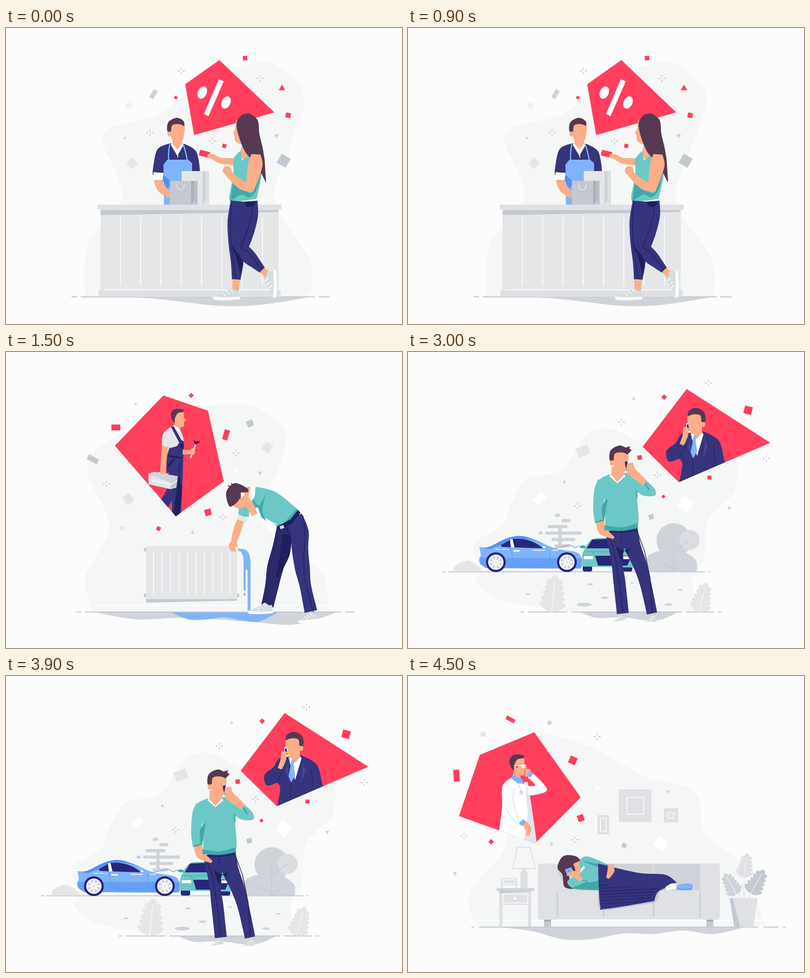
An HTML page that plays this animation: 800x600 px, repeating every 6000 ms.

```html
<!DOCTYPE html>
<html lang="en">
<head>
<meta charset="utf-8">
<title>Everyday help scenes</title>
<style>
html, body { margin: 0; width: 100%; height: 100%; overflow: hidden; background: #fcfcfc }
svg { display: block; width: 100%; height: 100% }
</style>
</head>
<body>
<svg id="stage" viewBox="0 0 800 600"></svg>
<script>
const BLOB = '#f5f7f7', RED = '#ff3f5c', NAVY = '#35347d', DARK = '#201f5e', GLASS = '#28267c', TEAL = '#6cc8c6', SEA = '#40a9a7',
  SKIN = '#fbae88', TAN = '#f39b75', HAIR = '#573852', PALE = '#e4e6e8', SOFT = '#dfe1e5', MID = '#d1d3da', GREY = '#c4c8d0',
  BLUE = '#80b4fa', DEEP = '#4f94f3', SHOE = '#d5dddf', WHITE = '#fff';

const repeat = (n, draw) => Array.from({ length: n }, (_, i) => draw(i)).join('');
const path = (fill, d) => `<path fill="${fill}" d="${d}"/>`;
const poly = (fill, pts) => `<polygon fill="${fill}" points="${pts}"/>`;
const rect = (fill, x, y, w, h, r = 0) => `<rect x="${x}" y="${y}" width="${w}" height="${h}" rx="${r}" fill="${fill}"/>`;
const line = (color, w, d) => `<path fill="none" stroke="${color}" stroke-width="${w}" stroke-linecap="round" stroke-linejoin="round" d="${d}"/>`;
const put = (art, x, y, turn = 0, sx = 1, sy = sx) => `<g transform="translate(${x} ${y}) rotate(${turn}) scale(${sx} ${sy})">${art}</g>`;
const oval = (fill, x, y, rx, ry = rx, turn = 0) => put(`<ellipse rx="${rx}" ry="${ry}" fill="${fill}"/>`, x, y, turn);
const chip = (fill, x, y, turn, w, h = w) => put(rect(fill, -w / 2, -h / 2, w, h), x, y, turn);
const tri = (fill, x, y, r, turn) => put(path(fill, `M0 ${-r}L${r} ${r * .8}H${-r}Z`), x, y, turn);
const inside = (id, pts, ...art) => `<clipPath id="${id}">${poly('', pts)}</clipPath>${poly(RED, pts)}<g clip-path="url(#${id})">${art.join('')}</g>`;

// Smooth closed shape through points; a trailing * marks a corner.
function form(fill, text) {
  const p = text.split(' ').map(s => [...s.replace('*', '').split(',').map(Number), s.endsWith('*')]);
  const n = p.length, at = i => p[(i + n) % n];
  const handle = (i, side) => {
    const a = at(i), k = a[2] ? 0 : side / 6;
    return [0, 1].map(j => (a[j] + (at(i + 1)[j] - at(i - 1)[j]) * k).toFixed(1));
  };
  return path(fill, `M${at(0).slice(0, 2)}` + repeat(n, i => `C${handle(i, 1)} ${handle(i + 1, -1)} ${at(i + 1).slice(0, 2)}`));
}
// Tapered tube along joints given as x,y,width.
function limb(fill, text) {
  const p = text.split(' ').map(s => s.split(',').map(Number)), last = p.length - 1;
  const edge = side => p.map(([x, y, w], i) => {
    const [a, b] = p[Math.max(0, i - 1)], [c, d] = p[Math.min(last, i + 1)], k = side * w / 2 / Math.hypot(c - a, d - b);
    return `${x - (d - b) * k},${y + (c - a) * k}${i % last ? '' : '*'}`;
  });
  return form(fill, [...edge(1), ...edge(-1).reverse()].join(' '));
}
// Pool below the ground line, with evenly spaced depths.
const pool = (fill, from, to, y, ...depths) => form(fill, [`${from},${y}*`,
  ...depths.map((d, i) => `${from + (to - from) * (i + 1) / (depths.length + 1)},${y + d}`), `${to},${y}*`].join(' '));
const ground = (y, ...spans) => spans.map(([a, b]) => line(GREY, 2, `M${a} ${y}H${b}`)).join('');
const bars = (n, x, step, top, bottom) => repeat(n, i => line('#f8f9f9', 2, `M${x + i * step} ${top}V${bottom}`));
const sparks = (...spots) => spots.map(([x, y]) => repeat(4, i =>
  put(line(GREY, 2, i % 2 ? 'M3.500 0h2' : 'M4 0h2.500'), x, y, i * 90))).join('');

// People
const head = (x, y, sx, sy) => put(oval(SKIN, -16, 2, 4, 6) + form(SKIN, '-14,-15 13,-17 13,8 7,20 -3,21 -11,13') +
  form(HAIR, '-20,-3 -18,-21 -1,-30 13,-23 14,-13* 4,-17 -10,-15 -12,-3*') + line(TAN, 1, 'M5 -4Q6 3 9 5L6 7'), x, y, 0, sx, sy);
const profile = (x, y, s) => put(form(SKIN, '-7,-12 12,-14* 13,-2 17,4 13,6 12,16 5,17* 6,26* -9,20* -6,5') +
  form(HAIR, '-14,-8 -10,-17 0,-20 12,-18* 11,-13* 0,-11 -6,0* -6,8* -11,3'), x, y, 0, s);
const neck = (x, y, w, h) => path(SKIN, `M${x - w * .75} ${y - 16}h${w * 1.5}V${y + 5}L${x} ${y + w}L${x - w * .75} ${y + 5}Z`) +
  path(WHITE, `M${x - w * .85} ${y}L${x} ${y + w}L${x + w * .85} ${y}L${x + w} ${y + 4}L${x} ${y + h}L${x - w} ${y + 4}Z`);
const shoe = (x, y, turn, s, tall = s) => put(form(SHOE, '-54,-3 -40,-9 -17,-22* -8,-16 -2,-17* 0,1* -52,1') +
  path(WHITE, 'M-55 -4Q-40 -1 0 -3V2Q-30 5 -53 3Z') + repeat(3, i => line(WHITE, 1.6, `M${-35 + i * 7} ${-11 - i * 4}l6 6`)), x, y, turn, s, tall);

// Plants and wheels
const leaf = (fill, x, y, s, turn) => put(oval(fill, 0, -29, 9, 27) +
  repeat(10, i => { const k = i >> 1, side = i % 2 * 2 - 1; return oval(fill, side * (10 - k), -8 - k * 9, 11 - k, 4.5, side * -32); }) +
  line(BLOB, 1.2, 'M0 0V-46'), x, y, turn, s);
const wheel = (x, y) => oval(GLASS, x, y, 20) + oval('#f5f7f7', x, y, 15.5) + oval(MID, x, y, 13) +
  repeat(8, i => put(line('#f5f7f7', 3.5, 'M0 0V-13'), x, y, i * 45)) + oval('#f5f7f7', x, y, 6) + oval(MID, x, y, 2);

const bag = (x, y, w, front, side, fold) => rect(front, x, y, w, 358 - y) + rect(side, x + w, y, 6, 358 - y) + rect(fold, x + w + 6, y, 7, 358 - y) +
  path(front, `M${x + w} 358l6.500 -8l6.500 8Z`) + line(PALE, 1.5, `M${x + 14} ${y + 7}c-1 15 16 15 15 0`);

const shop = [
  form(BLOB, '195,230 215,200 308,176 400,110 505,69 568,90 603,148 565,262 543,355 614,470 615,545* 160,545* 165,440 231,357 225,300'),
  pool(MID, 240, 615, 545, 4, 11, 18, 18, 11), ground(545, [133, 143], [152, 623], [632, 653]),
  // clerk
  form(NAVY, '332,234* 306,246 297,285 297,298* 392,290* 384,250 357,234*'),
  neck(346, 233, 13, 26), line(WHITE, 1.6, 'M347 250V262'), head(346, 212, 1),
  line(BLUE, 2.5, 'M331 236Q327 252 329 269M358 236Q364 252 366 269'), poly(BLUE, '318,277 326,267 368,267 376,274 376,358 319,358'),
  limb(DEEP, '315,300,8 332,320,16'), limb(SKIN, '307,306,18 314,326,16 333,340,13'), limb(WHITE, '308,293,20 307,308,19'),
  bag(355, 290, 42, PALE, '#cfd2d8', '#dcdfe3'), bag(331, 310, 43, GREY, '#abafbc', '#b9bdc8'),
  // counter
  rect(PALE, 191, 367, 360, 165), rect(SOFT, 185, 358, 372, 10), poly(GREY, '191,369 550,369 550,373 191,379'),
  bars(8, 231, 41, 384, 522), rect(SOFT, 187, 531, 368, 14), line('#f8f9f9', 2, 'M198 531H543'),
  // discount tag
  poly(RED, '431,65 542,171 380,217 362,114'), poly(WHITE, '430,104 440,108 409,179 400,174'),
  repeat(2, i => oval(WHITE, 396.5 + 48 * i, 131 + 20 * i, 9, 13, 25)),
  chip(RED, 483, 61, -5, 9), tri(RED, 557.5, 121, 6.5), chip(RED, 570, 177, 12, 10), chip(RED, 343, 141, 28, 6), chip(RED, 441, 239, 14, 8),
  chip(MID, 298, 134, 30, 9, 19), chip('#f0f1f2', 248, 158, 35, 12), chip(PALE, 255, 274, 45, 17), chip(GREY, 561, 269, 30, 21),
  tri(MID, 240, 223, 3), tri(MID, 546.5, 219, 5, 180), sparks([354, 87], [513, 102], [291, 212], [417, 229]),
  // shopper
  chip(RED, 401, 255, 14, 21, 12), limb(SKIN, '407,259,7 418,261,10 434,269,12 462,271,15'),
  form(SKIN, '465,186* 463,203 459,213 462,217 463,229 477,237* 472,254* 482,272* 500,255* 490,200*'),
  form(TEAL, '474,249* 460,265 459,298 451,343 455,353* 506,347* 516,300 516,265 494,254* 477,269*'),
  form(SEA, '458,316* 495,336* 518,280* 507,326 492,343 475,338 453,352*'),
  limb(HAIR, '484,174,14 487,190,43 492,220,41 502,248,35 514,270,18 519,290,10 525,312,1'),
  limb(SKIN, '505,256,18 504,275,29 499,300,25 492,330,16'), limb(SKIN, '499,326,15 478,319,19 457,303,14 447,290,14'), oval(SKIN, 447, 289, 9, 9),
  poly('#f3f5f5', '484,350 506,346 506,352 486,356'),
  limb(NAVY, '469,351,30 465,395,35 462,440,24 467,475,25 465,510,17'), poly(DARK, '455,440 480,470 474,500 464,462'),
  limb(NAVY, '492,351,32 494,380,30 486,415,29 476,448,24'), limb(NAVY, '473,440,20 490,463,29 506,479,21 518,491,14'),
  line(DARK, 1.3, 'M456 357Q451 407 456 445L464 507M497 352C500 387 483 420 475 442Q478 452 488 452L517 490'), path(DARK, 'M483 353Q483 363 492 363Q502 363 505 352Z'),
  limb(SKIN, '465,511,15 464,534,13'), limb(SKIN, '518,490,12 531,504,17'), shoe(473, 548, 0, 1), shoe(543, 492, -90, 1)
];

const leak = [
  form(BLOB, '165,245 191,191 320,130 470,105 561,154 550,240 509,322 560,390 640,449 651,528* 178,528* 160,456 208,355'),
  line(WHITE, 2, 'M185 514H654'),
  pool(MID, 183, 667, 528, 14, 11, 14, 20, 24), pool(BLUE, 334, 548, 528, 14, 14, 10, 16, 18), ground(527, [142, 151], [160, 677], [686, 703]),
  // radiator
  repeat(4, i => rect(GREY, i % 2 ? 465 : 278.5, i < 2 ? 397 : 490, 6, 7)),
  poly(GREY, '283,500 467,500 467,504 283,508'), rect(PALE, 283, 393, 184, 108, 4), bars(10, 298, 17.2, 405, 490),
  path(BLUE, 'M470 399H475C491 399 494 413 494 430V530H488V443Q485 438 484 443V483Q482 486 480 483V430C480 412 477 404 470 403Z'), oval(BLUE, 482, 491, 2, 3),
  inside('pent', '318,88 408,119 440,262 343,333 220,190',
    profile(347, 135, 1), form(PALE, '338,149* 318,165 315,190* 328,195* 326,211* 355,212* 359,180 352,160'), poly(WHITE, '338,148 348,153 355,164 343,157'),
    limb(NAVY, '345,205,26 346,250,22 344,336,18'), limb(NAVY, '341,207,32 338,240,27 338,272,21 318,312,20'),
    poly(NAVY, '325,212 330,195 345,191 350,184 333,151 339,151 354,178 359,181 359,212'),
    form(DARK, '354,217* 349,243 355,282 351,333* 337,333* 345,280*'), line(DARK, 3, 'M326 210L355 215M327 233L338 218'), rect(DARK, 352, 186, 7, 8),
    line(PALE, 3, 'M383 188L373 214'), form(DARK, '378,177* 383,181 393,181* 383,188*'), limb(SKIN, '357,203,10 375,203,8'), oval(SKIN, 377, 202, 5, 7),
    poly(PALE, '288,246 300,243 347,252 344,275 332,278 288,268'), poly(MID, '287,248 300,243 347,252 334,265'), poly(GREY, '334,264 347,253 344,273 332,278'),
    line(WHITE, 1.5, 'M288 259L333 268L345 261M309 244Q317 251 328 246'), limb(SKIN, '322,191,14 319,215,12 317,248,11')),
  chip(RED, 222, 153, 0, 18, 12), chip(RED, 374, 88, 45, 7.5), chip(RED, 444.5, 168, 16, 11, 21), chip(RED, 408, 325, -15, 13), chip(RED, 308, 358, 25, 8),
  chip(GREY, 175.5, 217.5, 28, 23, 11), chip(GREY, 493, 145, -22, 13), chip(PALE, 528, 193, 30, 17, 19), chip(PALE, 247, 298, -35, 17, 19), chip(PALE, 235, 357, 15, 8), oval(WHITE, 464, 240, 3),
  tri(MID, 262, 104, 3), tri(MID, 513, 246, 4.5, 180), tri(MID, 377, 365, 4), sparks([465, 205], [203, 267], [438, 335]),
  // tired man
  limb('#2c2a6c', '564,352,32 557,395,36 544,437,33 537,475,27 528,515,25'), limb(DARK, '568,370,18 563,410,20 548,455,4'),
  limb(NAVY, '580,335,38 593,365,37 594,400,33 599,440,30 605,475,23 616,526,26'),
  line(DARK, 1.2, 'M600 332Q607 373 601 415L603 462L621 527M549 363Q541 415 532 437L524 516'),
  shoe(539, 528, 0, .92), shoe(630, 543, -6, .73, .8),
  limb(SKIN, '474,341,14 467,362,16 461,383,12 459,404,11'), oval(SKIN, 459, 393, 9, 10), line(WHITE, 3, 'M465 396l2 6'),
  limb(TEAL, '481,312,20 480,334,22'), limb(PALE, '479,333,20 475,342,18'),
  oval(SKIN, 472, 305, 15, 12), oval(SKIN, 490, 285, 9, 12), form(HAIR, '445,284 462,266 487,276 489,284* 474,285* 473,297 459,311 450,311'),
  line(HAIR, 2, 'M456 274l-7 -3M461 270l-6 -3'),
  form(TEAL, '502,273* 545,284 590,320* 576,339 554,352* 513,329 494,297*'), form(SEA, '525,286* 512,311 499,299 496,310* 512,331 527,343* 518,322'),
  form(SEA, '539,349* 560,347 586,318* 590,321* 575,342 554,355*'), poly(WHITE, '494,274 504,273 503,290 497,302 490,294'),
  limb(WHITE, '504,316,10 508,341,20'), limb(SKIN, '502,330,13 490,306,16 476,296,13'), line(TAN, 1, 'M470 299L482 298'),
  poly(DARK, '590,320 595,326 576,349 552,361 548,354 575,339'), chip(PALE, 557.5, 355, -20, 8, 6)
];

const crash = [
  form(BLOB, '207,310 243,256 310,240 360,170 415,157 520,205 650,213 660,280 607,340 598,420 574,465 590,527* 330,527* 185,503 138,465 148,445 132,390 190,352'),
  pool(MID, 347, 546, 527, 12, 11, 12, 17, 15), ground(445.5, [71, 76], [82, 600], [607, 610]), ground(527, [228, 234], [243, 321], [331, 553], [563, 617], [626, 632]),
  form(PALE, '91,445* 97,432 121,423 145,436 149,445*'),
  form(MID, '481,445* 486,412 540,400 580,420 583,445*'), oval(MID, 537, 382, 35), oval('#dbdde2', 569, 381, 20.5),
  line(GREY, 1.6, 'M537 383V445M568 381L537 406M511 424L537 442M554 432L538 444'),
  line(MID, 6.5, 'M267 367h2M280 367h68M285 354h34M313 342h12M300 331h4M293 380h42M299 393h25M307 354v39'),
  [[356, 512, 15], [397, 498, 8], [526, 512, 8], [368, 471, 6], [453, 468, 4], [242, 491, 5], [550, 482, 5]].map(([x, y, r]) => oval(MID, x, y, r, .8 + r * .2)).join(''),
  leaf(PALE, 290, 527, 1.35, 6), leaf(PALE, 587, 527, 1.1, 15),
  // cars
  repeat(2, i => rect(GLASS, 353 + 81 * i, 427, 19, 18, 4)),
  form(TEAL, '352,435* 353,408 370,381 400,377 430,378 447,399 456,410 456,437*'),
  poly(GLASS, '361,398 372,380 430,378 444,398'), poly(GLASS, '378,413 452,413 443,433 384,433'),
  line(SEA, 1.2, 'M356 405H451M372 405L378 411'), repeat(2, i => rect(WHITE, 355 + 80 * i, 414, 19, 6)), oval(SEA, 353, 395, 6, 3),
  form(BLUE, '144,395* 163,395 205,376 240,375 297,398 344,408 351,435 343,439* 158,438* 144,425 147,411'),
  poly('#65a0f6', '144,417 351,418 350,436 343,439 158,438 146,430'),
  form(DEEP, '145,395* 163,395 205,376 240,375 297,398* 236,379 165,400*'),
  poly(GLASS, '187,392 206,381 208,396 190,395'), path(GLASS, 'M211 379Q247 375 273 398L215 396Z'), poly(WHITE, '206,380 211,379 215,396 208,396'), poly(WHITE, '272,398 273,393 279,396'),
  line('#5b96ee', 1.2, 'M208 397Q211 424 219 432H283Q290 424 286 401M297 398L327 391L338 397L346 393'),
  line(WHITE, 1.6, 'M177 400h9M190 400h7M201 401h2M252 402h24M292 402h10'), line(WHITE, 3, 'M214 403h11'),
  wheel(177.5, 426), wheel(321, 426),
  // caller
  limb(NAVY, '417,361,38 421,390,34 422,425,22 427,465,24 434,530,24'), limb(NAVY, '447,359,34 454,395,33 468,430,28 480,470,23 493,530,21'),
  form(DARK, '420,394* 438,402 455,394* 445,405 452,420* 437,403 431,427*'),
  line(DARK, 1.3, 'M406 375L416 402L426 460L434 525M431 365V383M463 363L478 404L489 458L493 528'), line(DARK, 2, 'M400 363Q434 369 462 360'),
  limb(SKIN, '388,343,17 394,363,17 416,377,5'),
  form(TEAL, '409,248* 386,261 397,297 398,361* 463,357* 466,340 463,300 460,255 437,245*'), limb(TEAL, '394,261,20 388,280,23 384,318,20 387,344,19'),
  form(TEAL, '438,245* 462,255 483,262* 498,277 499,291 476,291 460,280*'),
  limb(SEA, '402,299,3 396,316,9 395,340,3'), limb(SEA, '397,356,10 431,359,7 464,352,10'), line(SEA, 3, 'M462 281V295M476 261L487 279M379 345L395 341'),
  neck(423, 248, 16, 18), head(429, 222, 1.08), poly(HAIR, '438,194 449,191 447,196 452,199 444,207'),
  poly(GLASS, '438,223 443,221 445,239 441,241'), limb(SKIN, '449,225,12 450,240,18 464,253,16 479,266,13'), line(BLUE, 2, 'M440 235l4 5'),
  shoe(440, 545, -8, .48, .65), shoe(502, 549, 0, .4, .75),
  inside('kite', '563,75 732,184 547,264 474,192',
    form(NAVY, '573,164* 552,167 541,184 522,201 527,222 547,216* 554,228 547,270* 650,240* 640,222 628,180 596,161*'),
    line(DARK, 1.2, 'M548 215L560 190M620 224L617 190M575 216V255'), neck(584, 163, 13, 48), head(580, 144, -1.03, 1.03),
    repeat(2, i => put(poly('#4544a0', '0,0 -9,28 0,53 -4,20'), 574 + 22 * i, 164, 0, 1 - 2 * i, 1)),
    poly(BLUE, '577,170 583,169 581,179 584,202 576,216 571,203'),
    poly(WHITE, '562,145 566,143 571,164 562,163'), poly(GLASS, '563,148 566,146 569,159 565,159'), limb(SKIN, '553,188,9 560,170,11 562,153,12')),
  chip(RED, 517.5, 91.5, 45, 8), chip(RED, 687, 118, 14, 16), chip(RED, 468, 214, -8, 9), chip(RED, 609, 254.5, 3, 8), chip(RED, 516, 293, -40, 6),
  chip(PALE, 353.5, 201, -22, 25, 20), chip(GREY, 491.5, 334, -12, 10), chip(WHITE, 266, 297, -42, 23, 14), chip(WHITE, 560.5, 309.5, 38, 25),
  tri(MID, 456, 94, 3.5), tri(MID, 316, 263, 3.5), tri(MID, 649, 317, 4, 180), sparks([431, 142], [607, 63], [724, 216], [504, 250], [343, 312])
];

const frame = (x, y, w, h, m) => rect(SOFT, x, y, w, h) + line(BLOB, 2, `M${x + m} ${y + m}h${w - 2 * m}v${h - 2 * m}h${2 * m - w}Z`);
const sofa = [
  form(BLOB, '198,340 195,200 258,120 370,145 480,204 580,235 600,317 674,384 722,508* 140,508* 124,440'),
  line(WHITE, 2, 'M136 496H742'), pool(MID, 193, 677, 510, 8, 24, 23, 12, 13, 6, 13), ground(509, [129, 133], [144, 707], [719, 747], [758, 762]),
  frame(426, 230, 66, 66, 16), frame(383, 282, 23, 39, 6), frame(517, 268, 29, 29, 9),
  // lamp and side table
  line(SOFT, 2, 'M221 347H247L257 390H212Z'), rect(SOFT, 231, 390, 7, 8), rect(SOFT, 227, 395, 15, 36, 5),
  line(SOFT, 2.5, 'M189 429V411H219V429'), frame(189, 410, 30, 14, 3), repeat(2, i => rect(SOFT, 184 + 58 * i, 436, 7, 72)),
  frame(188, 438, 58, 26, 4), poly(GREY, '184,435 249,435 249,437 184,440'), rect(MID, 179, 430, 76, 6), oval(WHITE, 216, 451, 2.7),
  // couch
  rect(MID, 296, 380.5, 298, 60, 4), rect(SOFT, 300, 435, 292, 58), path(SOFT, 'M302 398Q315 430 350 434H302Z'),
  repeat(2, i => rect(GREY, 275 + 328 * i, 492, 14, 16) + rect('#a9aeba', 275 + 328 * i, 494, 14, 4) + rect(SOFT, 262 + 328 * i, 380, 40, 114, 6)),
  line(GREY, 2, 'M301.500 440V489M395 440V489M496 440V489M590 440V489'), line(SOFT, 2, 'M496 384V434'),
  // resting woman
  path(GREY, 'M384 381V465Q387 476 398 475L497 460Q509 453 507 437L545 424V415Z'),
  form(HAIR, '302,388 314,365 342,367 351,388 326,403 334,432* 316,427 312,403'),
  limb(SKIN, '340,378,14 346,390,17 341,400,6'), form(TEAL, '346,376 364,366 414,387* 385,389* 386,434* 338,432 322,416 348,399'),
  limb(SEA, '354,375,1 385,384,6 407,385,4'), form(SEA, '328,431* 362,416 350,414 369,418 386,414* 386,434*'), poly(WHITE, '351,388 356,385 357,390 347,399'),
  limb(SKIN, '321,400,10 334,401,12 351,414,9'), chip(BLUE, 325, 394, -20, 14, 9), oval(DEEP, 325, 395, 2), line(SKIN, 3, 'M331 394L339 403'),
  form(NAVY, '384,380* 465,399 520,403 544,421* 507,436 498,456* 400,472 388,464'),
  line(DARK, 1.1, repeat(7, i => `M${388 + i} ${424 + 6.2 * i}L${[407, 448][i] || 510 - 4 * i} ${[423, 427][i] || 419 + 6.2 * i}`)),
  limb(SKIN, '409,382,11 410,395,14 403,410,6'), line(TAN, 1, 'M409 405L412 396M403 403L407 397'),
  limb(WHITE, '521,432,8 532,427,12 544,426,12'), oval(SKIN, 545, 426, 3, 4), form(BLUE, '545,425 556,421 574,422 573,433 557,434 543,433'), line(DEEP, 1.5, 'M545 431L560 433L572 431'),
  inside('penta', '255,114 349,246 257,339 103,284 145,160',
    limb('#e3e3ef', '238,215,8 242,280,20 246,345,30'), profile(221, 182, 1.15), limb(SKIN, '242,188,10 243,204,13'),
    line('#f5f7f7', 1.6, 'M216 182L239 181'), oval('#f5f7f7', 233, 183, 4.5, 4), oval(GLASS, 220, 184, 1.5),
    form(WHITE, '209,206* 191,223 190,265 184,315* 234,333* 243,279 239,222*'), form(WHITE, '252,197* 281,231 243,242* 233,222* 257,222 242,206*'),
    line('#e3e3ef', 1.8, 'M214 229C206 263 221 267 223 296M243 242Q258 241 275 236M216 208L229 232M198 268Q207 290 224 302'),
    line('#e3e3ef', 3, 'M240 224C239 263 247 269 241 294'), oval('#dadbe8', 229, 236, 4, 5),
    poly(BLUE, '207,206 213,200 231,209 233,217 222,218'), limb(BLUE, '243,203,9 250,195,8'),
    limb(SKIN, '234,297,11 243,309,13 242,324,7'), limb(BLUE, '227,301,9 236,293,8')),
  chip(RED, 207, 88, 28, 19, 8), chip(RED, 98, 202, -4, 12, 24), chip(RED, 333, 171, 25, 15), chip(RED, 349, 288, -18, 13), chip(RED, 168, 336, 45, 8),
  chip(PALE, 152, 118, 0, 10), chip(MID, 286, 95, 35, 8), chip(WHITE, 382, 228, 35, 7), chip(WHITE, 510.5, 340, 32, 22), chip(GREY, 437, 343.5, 25, 9),
  tri(MID, 525, 235, 4, 200), tri(MID, 290, 340, 4, -10), tri(MID, 95, 401, 4, 180), sparks([382, 123], [113, 325], [337, 332]),
  // pot plant
  line(SOFT, 1.5, 'M679 450Q678 418 680 400M672 450Q668 438 658 431M690 450Q691 440 700 427'),
  leaf(SOFT, 678, 409, .9, 9), leaf(MID, 664, 444, .9, -29), leaf(GREY, 692, 442, 1, 29),
  poly(SOFT, '650,450 706,450 698,509 659,509'), poly(GREY, '650,450 656,450 671,509 659,509')
];

const stage = document.getElementById('stage');
stage.innerHTML = [shop, leak, crash, sofa].map(s => `<g>${s.join('')}</g>`).join('');
const scenes = [...stage.children];

function draw(now) {
  const active = Math.floor(now % 6000 / 1500);
  scenes.forEach((g, i) => g.style.display = i === active ? '' : 'none');
  requestAnimationFrame(draw);
}
draw(performance.now());
</script>
</body>
</html>
```
